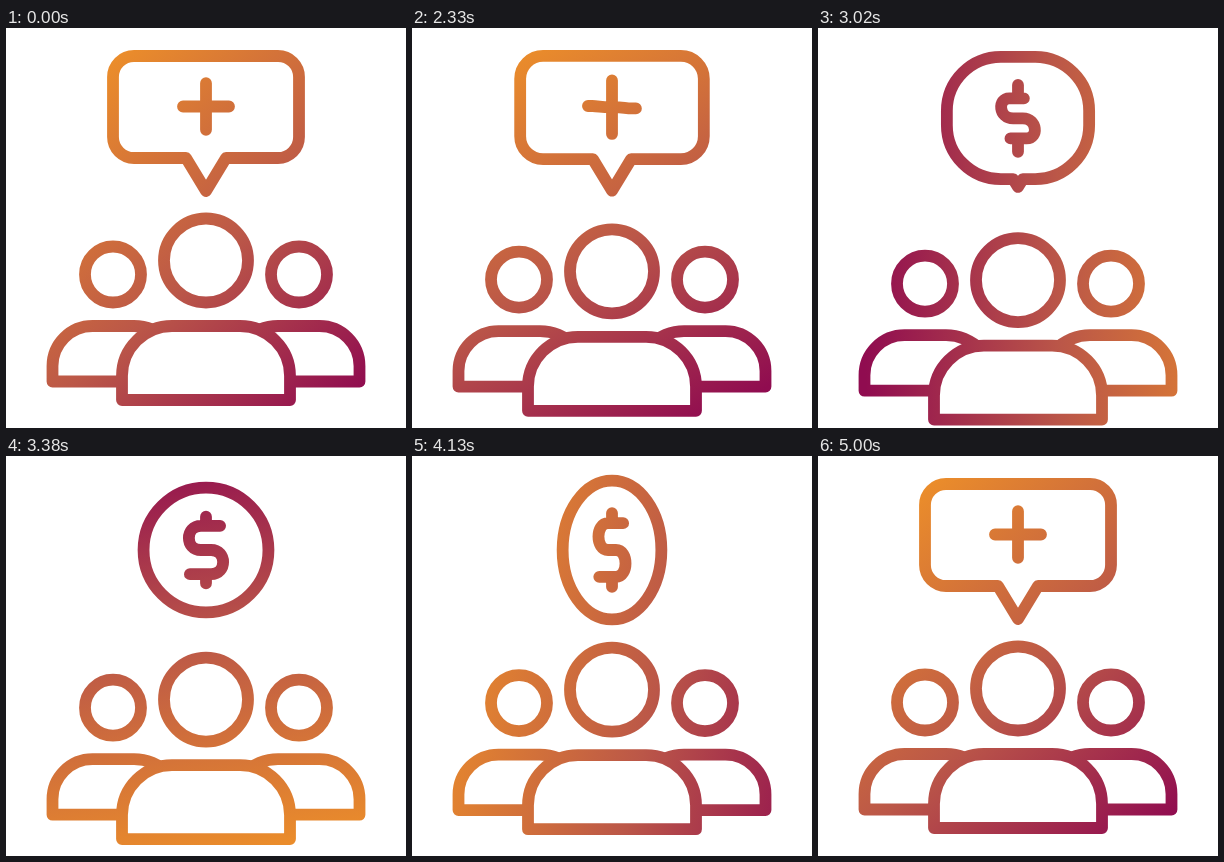
Write an HTML page with a canvas that moves like this. It is 400x400 px and loops after 5.03 s.

```html
<!DOCTYPE html>
<html lang="en">
<head>
<meta charset="utf-8">
<title>Group advice icon</title>
<style>
html, body { margin: 0; height: 100%; overflow: hidden; background: #fff; }
canvas { display: block; width: 100vw; height: 100vh; }
</style>
</head>
<body>
<canvas width="400" height="400"></canvas>
<script>
const LOOP = 5030, START = 2030, STEP = 30, FLIP = 4330;
const ctx = document.querySelector('canvas').getContext('2d');

const lerp = (a, b, k) => a + (b - a) * k;
const clamp = x => Math.min(1, Math.max(0, x));
const part = (t, from, to) => clamp((t - from) / (to - from));
const smooth = x => (1 - Math.cos(Math.PI * x)) / 2;

// Eased timing curve with control points (x1, 0) and (x2, 1)
function curve(x, x1, x2) {
  let lo = 0, hi = 1, s;
  for (let i = 0; i < 24; i++) {
    s = (lo + hi) / 2;
    const r = 1 - s;
    if (3 * s * r * r * x1 + 3 * s * s * r * x2 + s * s * s < x) lo = s; else hi = s;
  }
  return s * s * (3 - 2 * s);
}

// Value at time t on a list of [time, value] keys
function track(t, ...keys) {
  if (t <= keys[0][0]) return keys[0][1];
  for (let i = 1; i < keys.length; i++) {
    const [t0, v0] = keys[i - 1], [t1, v1] = keys[i];
    if (t < t1) return lerp(v0, v1, smooth(part(t, t0, t1)));
  }
  return keys[keys.length - 1][1];
}

// Builds a path around (x, y) and strokes it at constant weight
function draw(x, y, sx, sy, build, fill) {
  ctx.setTransform(sx, 0, 0, sy, x, y);
  ctx.beginPath();
  build();
  ctx.resetTransform();
  if (fill) ctx.fill();
  ctx.stroke();
}

function setGradient(t) {
  const turn = curve(part(t, 2000, 5000), 0.36, 0.4);
  const a = (48 + 360 * turn) * Math.PI / 180;
  const x = 248, y = 184, dx = 205 * Math.cos(a), dy = 205 * Math.sin(a);
  const g = ctx.createLinearGradient(x - dx, y - dy, x + dx, y + dy);
  g.addColorStop(0, '#ea8c2b');
  g.addColorStop(0.52, '#bb5748');
  g.addColorStop(1, '#900c50');
  ctx.strokeStyle = g;
}

function people(t) {
  const drop = 21 * (smooth(part(t, START, 2620)) - curve(part(t, 2760, 4700), 0.35, 0.2));
  for (const side of [-1, 1]) {
    const y = drop * 0.47;
    draw(200 + side * 93, 246.5 + y, 1, 1, () => ctx.arc(0, 0, 28, 0, 7));
    draw(200, y, side, 1, () => {
      ctx.moveTo(84, 353.5);
      ctx.lineTo(153.5, 353.5);
      ctx.lineTo(153.5, 338);
      ctx.arcTo(153.5, 298, 113.5, 298, 40);
      ctx.lineTo(72, 298);
      ctx.quadraticCurveTo(53, 298, 36, 313);
    });
  }
  draw(200, 232.5 + drop, 1, 1, () => ctx.arc(0, 0, 42, 0, 7));
  draw(200, drop, 1, 1, () => {
    ctx.moveTo(-84, 372);
    ctx.arcTo(-84, 298, -34, 298, 50);
    ctx.arcTo(84, 298, 84, 348, 50);
    ctx.lineTo(84, 372);
    ctx.closePath();
  }, true);
}

// Speech bubble (m = 0) turning into a coin (m = 1)
function bubble(m, sx, sy) {
  const w = lerp(93, 62, m), r = lerp(21, 62, m), pivot = lerp(163, 94, m);
  const top = lerp(28, 32, m) - pivot, bottom = lerp(130, 156, m) - pivot;
  const tail = lerp(20, 0, m), tip = lerp(163, 156, m) - pivot;
  draw(200, pivot, sx, sy, () => {
    ctx.moveTo(0, tip);
    ctx.lineTo(-tail, bottom);
    ctx.arcTo(-w, bottom, -w, top, r);
    ctx.arcTo(-w, top, w, top, r);
    ctx.arcTo(w, top, w, bottom, r);
    ctx.arcTo(w, bottom, 0, bottom, r);
    ctx.lineTo(tail, bottom);
    ctx.closePath();
  });
}

const DOLLAR = [[14, -24], [-5, -24], [-21, -24], [-21, 0], [-5, 0],
                [5, 0], [21, 0], [21, 24], [5, 24], [-16, 24]];

// Plus (m = 0) turning into a dollar sign (m = 1)
function sign(m, sx, sy) {
  const p = DOLLAR.map(([x, y], i) => [lerp(-23 + 46 * i / 9, x, m), y * m]);
  draw(200, lerp(78.5, 94, m), sx, sy, () => {
    ctx.moveTo(...p[0]);
    ctx.lineTo(...p[1]);
    ctx.bezierCurveTo(...p[2], ...p[3], ...p[4]);
    ctx.lineTo(...p[5]);
    ctx.bezierCurveTo(...p[6], ...p[7], ...p[8]);
    ctx.lineTo(...p[9]);
    for (const side of [-1, 1]) {
      ctx.moveTo(0, side * 24 * m);
      ctx.lineTo(0, side * lerp(23.3, 33, m));
    }
  });
}

function badge(t) {
  if (t < START || t >= FLIP) {
    const sx = t < START ? 1 : Math.sin(part(t, FLIP, 4850) * Math.PI / 2);
    bubble(0, sx, 1);
    sign(0, sx, 1);
    return;
  }
  const m = track(t, [START, 0.05], [2650, 0.04], [3200, 1]);
  const spin = Math.cos(part(t, 3850, FLIP) ** 1.3 * Math.PI / 2);
  const pulse = [[3330, 1], [3720, 1.18], [FLIP, 1.1]];
  const outer = track(t, [2000, 1], [2100, 0.92], [2540, 1.074], [2750, 1.064], [3250, 1], ...pulse);
  const inner = track(t, [START, 1], [2540, 1.2], [2750, 1.2], [3250, 1], ...pulse);
  bubble(m, outer * spin, outer);
  sign(m, inner * spin, inner);
}

function frame() {
  let t = performance.now() % LOOP;
  t = t < START ? 0 : t - (t - START) % STEP;
  ctx.fillStyle = '#fff';
  ctx.fillRect(0, 0, 400, 400);
  ctx.lineWidth = 11.8;
  ctx.lineCap = ctx.lineJoin = 'round';
  setGradient(t);
  people(t);
  badge(t);
  requestAnimationFrame(frame);
}
frame();
</script>
</body>
</html>
```
